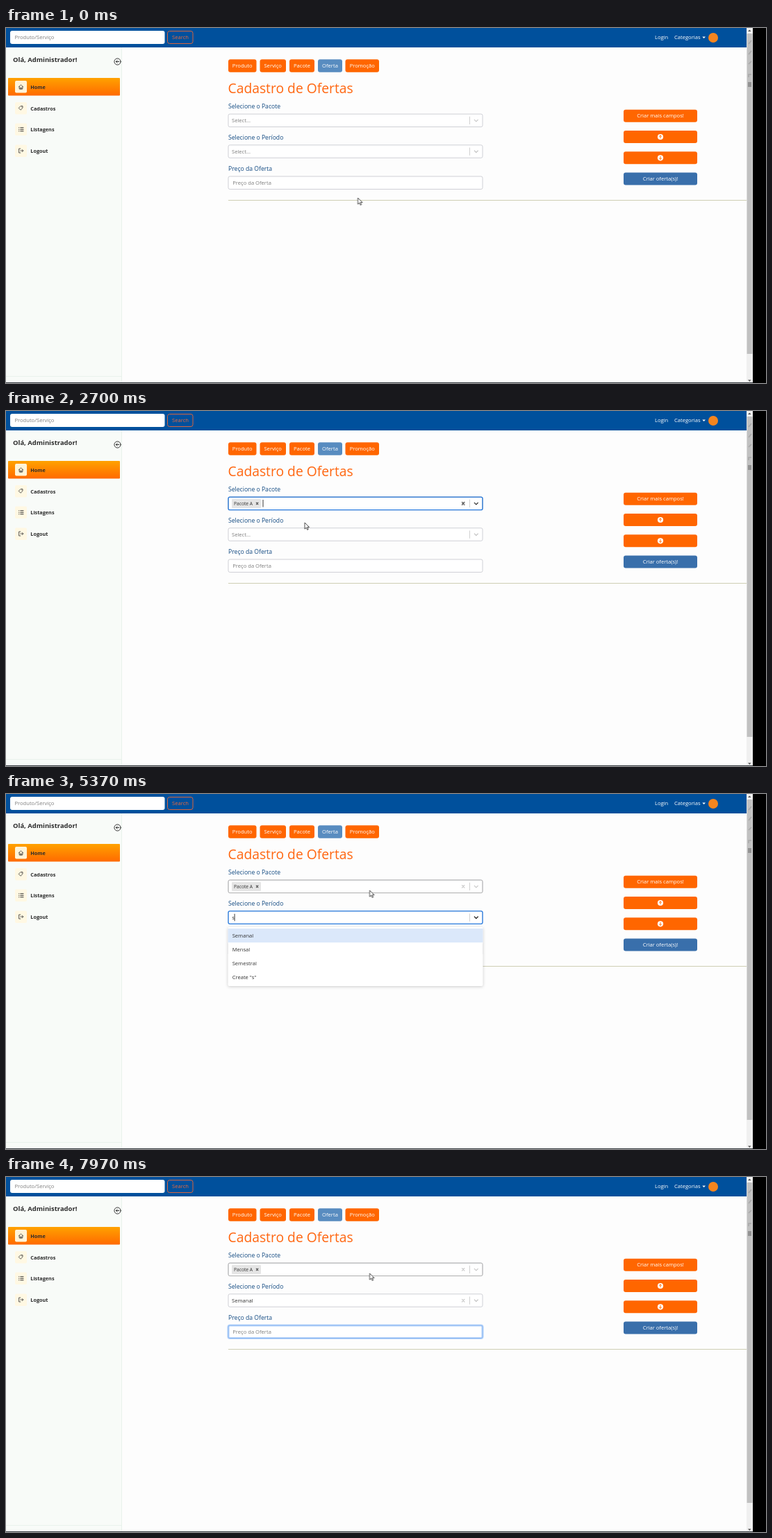
Recreate the animation shown at these times as an HTML page. Size 1094x512 px, loop 8000 ms.

```html
<!DOCTYPE html>
<html lang="pt-BR">
<head>
<meta charset="utf-8">
<title>Cadastro de Ofertas</title>
<style>
html, body { margin: 0; width: 100%; height: 100%; overflow: hidden; background: #fdfdfd; }
svg { display: block; width: 1094px; height: 512px; }
text { font: 7.6px "Open Sans", "Noto Sans", sans-serif; fill: #333; }
.mid { text-anchor: middle; }
.light { fill: #fff; }
.hint { fill: #7d7d7d; }
.label { font-size: 8.65px; font-weight: 500; fill: #124a82; }
.title { font-size: 19.3px; font-weight: 500; fill: #ff6610; }
.side { font-size: 7.25px; font-weight: 700; fill: #2b2b2b; }
.hello { font-size: 9.45px; font-weight: 700; fill: #2b2b2b; }
.chip { font-size: 6.7px; }
.orange { fill: #ff6600; }
.box { fill: #fff; stroke: #cfd0d6; }
.focus { fill: none; stroke: #2a7de1; stroke-width: 1.3; }
.line { fill: none; stroke: #333; stroke-linecap: round; stroke-linejoin: round; }
.pale { stroke: #c8c8c8; }
.caret { fill: #222; }
.menu { fill: #fff; filter: drop-shadow(0 1px 2px #0003); }
.active { fill: #dbe8fa; }

/* Every layer shares one 8 s clock; 1% = 80 ms. */
.t { animation: 8s step-end infinite; }
.hover1 { animation-name: hover1; }
.hint1 { animation-name: hint1; }
.focus1 { animation-name: focus1; }
.menu1 { animation-name: menu1; }
.chip1 { animation-name: chip1; }
.clear1 { animation-name: clear1; }
.caret1 { animation-name: caret1; }
.hint2 { animation-name: hint2; }
.focus2 { animation-name: focus2; }
.caret2 { animation-name: caret2; }
.key1 { animation-name: key1; }
.key2 { animation-name: key2; }
.key3 { animation-name: key3; }
.value2 { animation-name: value2; }
.clear2 { animation-name: clear2; }
.focus3 { animation-name: focus3; }
.caret3 { animation-name: caret3; }
.cursor { animation: cursor 8s linear infinite; }

@keyframes hover1 { 0% { opacity: 0 } 16.875% { opacity: 1 } }
@keyframes hint1 { 0% { opacity: 1 } 29.375% { opacity: 0 } }
@keyframes focus1 { 0%, 45% { opacity: 0 } 22.5% { opacity: 1 } }
@keyframes menu1 { 0%, 29.375% { opacity: 0 } 22.5% { opacity: 1 } }
@keyframes chip1 { 0% { opacity: 0 } 29.375% { opacity: 1 } }
@keyframes clear1 { 0%, 45% { opacity: 0 } 29.375% { opacity: 1 } }
@keyframes caret1 { 0%, 36%, 45% { opacity: 0 } 29.375%, 42.625% { opacity: 1 } }
@keyframes hint2 { 0% { opacity: 1 } 64.375% { opacity: 0 } }
@keyframes focus2 { 0%, 92.875% { opacity: 0 } 45% { opacity: 1 } }
@keyframes caret2 { 0%, 51.625%, 64.375%, 85.375% { opacity: 0 } 45%, 58.25%, 78.75% { opacity: 1 } }
@keyframes key1 { 0%, 70% { opacity: 0 } 64.375% { opacity: 1 } }
@keyframes key2 { 0%, 71.875% { opacity: 0 } 70% { opacity: 1 } }
@keyframes key3 { 0%, 78.75% { opacity: 0 } 71.875% { opacity: 1 } }
@keyframes value2 { 0% { opacity: 0 } 78.75% { opacity: 1 } }
@keyframes clear2 { 0%, 92.875% { opacity: 0 } 78.75% { opacity: 1 } }
@keyframes focus3 { 0% { opacity: 0 } 92.875% { opacity: 1 } }
@keyframes caret3 { 0%, 99.5% { opacity: 0 } 92.875% { opacity: 1 } }
@keyframes cursor {
  0%, 8.75% { transform: translate(506.5px, 245px) }
  17.5% { transform: translate(442.5px, 157px) }
  20%, 23% { transform: translate(436px, 134px) }
  27.5%, 36.25% { transform: translate(430px, 161px) }
  43.75%, 100% { transform: translate(523.5px, 139px) }
}
</style>
</head>
<body>
<svg viewBox="0 0 1094 512">
  <defs>
    <linearGradient id="glow" x2="0" y2="1">
      <stop stop-color="#ffa200"/><stop offset="1" stop-color="#ff6a00"/>
    </linearGradient>
    <path id="chevron" d="M-2.5-1.2 0 1.3 2.5-1.2"/>
    <path id="cross" d="M-1.7-1.8 1.7 1.8M1.7-1.8-1.7 1.8"/>
    <rect id="field" x="320" width="366" height="18.5" rx="2.2"/>
    <rect id="caret" width=".9" height="10.5"/>
    <rect id="wide" x="889" width="106" height="18" rx="3"/>
    <rect id="tile" x="13" width="17" height="17.5" rx="2"/>
    <path id="arrow" d="M0 2.2V-2.2M-1.8-.4 0-2.2 1.8-.4"/>
  </defs>

  <rect width="1094" height="512" fill="#fdfdfd"/>

  <!-- sidebar -->
  <rect y="28" width="166" height="484" fill="#f8fbf8"/>
  <path d="M0 502.5H166M166.5 28V512" fill="none" stroke="#e9f2ec"/>
  <text class="hello" x="10" y="49">Olá, Administrador!</text>
  <g class="line" transform="translate(160.5 48.5)">
    <circle r="4.6"/><use href="#arrow" transform="rotate(-90)"/>
  </g>
  <rect x="3" y="72" width="161" height="25.5" rx="1" fill="url(#glow)"/>
  <use href="#tile" y="76" fill="#fff4d8"/>
  <g fill="#fff8e3">
    <use href="#tile" y="107"/><use href="#tile" y="137.5"/><use href="#tile" y="168.5"/>
  </g>
  <g class="line" stroke-width=".8">
    <path d="M18.3 85 21.5 82 24.7 85M19.2 84.5V88H23.8V84.5M20.8 88V86H22.2V88"/>
    <path d="M18.5 115.2 21 112.6H24V115.3L21.3 118ZM22.7 114V114.1"/>
    <path d="M20.8 143.8H25M20.8 146.3H25M20.8 148.8H25M18.6 143.8H18.8M18.6 146.3H18.8M18.6 148.8H18.8" stroke-width="1.1"/>
    <path d="M20.8 174H18.6V180H20.8M20.8 177H24.8M23.3 175.5 24.8 177 23.3 178.5"/>
  </g>
  <text class="side" x="35.3" y="87.8">Home</text>
  <text class="side" x="35.3" y="118.6">Cadastros</text>
  <text class="side" x="35.3" y="149.4">Listagens</text>
  <text class="side" x="35.3" y="180.2">Logout</text>

  <!-- top bar -->
  <rect width="1066" height="28" fill="#00509c"/>
  <rect x="6" y="4" width="222.5" height="19" rx="3" fill="#fff"/>
  <text class="hint" x="12.5" y="16.4">Produto/Serviço</text>
  <rect x="232.5" y="4.5" width="36.5" height="18" rx="3" fill="none" stroke="#d9653f"/>
  <text class="mid" x="251" y="16.4" style="fill:#f0683a">Search</text>
  <text class="light" x="934" y="16.4">Login</text>
  <text class="light" x="962" y="16.4">Categorias</text>
  <path d="M1002.3 12.5H1007L1004.6 15Z" fill="#fff"/>
  <circle cx="1018" cy="14" r="7" fill="#f5851f"/>

  <!-- tabs -->
  <g class="orange">
    <rect x="320" y="45.3" width="40.5" height="18.5" rx="3"/>
    <rect x="365.5" y="45.3" width="37.5" height="18.5" rx="3"/>
    <rect x="408" y="45.3" width="36" height="18.5" rx="3"/>
    <rect x="488.5" y="45.3" width="48.5" height="18.5" rx="3"/>
  </g>
  <rect x="449" y="45.3" width="35" height="18.5" rx="3" fill="#588cc0"/>
  <g class="mid">
    <text class="light" x="340.2" y="57.4">Produto</text>
    <text class="light" x="384.2" y="57.4">Serviço</text>
    <text class="light" x="426" y="57.4">Pacote</text>
    <text class="light" x="466.5" y="57.4">Oferta</text>
    <text class="light" x="512.8" y="57.4">Promoção</text>
  </g>

  <!-- actions -->
  <g class="orange">
    <use href="#wide" y="117.8"/><use href="#wide" y="148"/><use href="#wide" y="178.2"/>
  </g>
  <use href="#wide" y="208.4" fill="#396fab"/>
  <text class="light mid" x="942" y="129.4">Criar mais campos!</text>
  <text class="light mid" x="942" y="220">Criar oferta(s)!</text>
  <g fill="#fff" stroke="#ff6600">
    <g transform="translate(942 157)"><circle r="4.1" stroke="none"/><use href="#arrow" fill="none"/></g>
    <g transform="translate(942 187.3) rotate(180)"><circle r="4.1" stroke="none"/><use href="#arrow" fill="none"/></g>
  </g>

  <!-- form -->
  <text class="title" x="319.5" y="94">Cadastro de Ofertas</text>
  <text class="label" x="320" y="116">Selecione o Pacote</text>
  <text class="label" x="320" y="160.7">Selecione o Período</text>
  <text class="label" x="320" y="206.2">Preço da Oferta</text>
  <path d="M320 248.5H1066" stroke="#cfcfb4"/>

  <use href="#field" class="box" y="124.1"/>
  <use href="#field" class="t hover1" y="124.1" fill="none" stroke="#b3b3b3"/>
  <use href="#field" class="box" y="168.8"/>
  <use href="#field" class="box" y="214"/>
  <path d="M667.5 127.7V139M667.5 172.5V183.8" stroke="#d0d0d0"/>
  <g class="line pale" stroke-width="1.2">
    <use href="#chevron" x="676.8" y="133.5"/>
    <use href="#chevron" x="676.8" y="178.2"/>
  </g>
  <text class="hint t hint1" x="325" y="136.2">Select...</text>
  <text class="hint t hint2" x="325" y="180.9">Select...</text>
  <text class="hint" x="326.3" y="226.2">Preço da Oferta</text>

  <g class="t focus1">
    <use href="#field" class="focus" y="124.1"/>
    <use href="#chevron" class="line" x="676.8" y="133.5" stroke-width="1.2"/>
  </g>
  <g class="t chip1">
    <rect x="325" y="127" width="42" height="13" rx="1.2" fill="#e5e5e5"/>
    <text class="chip" x="328" y="136">Pacote A</text>
    <use href="#cross" class="line" transform="translate(361.6 133.4) scale(.75)" stroke-width="1.4"/>
    <use href="#cross" class="line pale" x="658.2" y="133.4" stroke-width="1.2"/>
  </g>
  <use href="#cross" class="line t clear1" x="658.2" y="133.4" stroke-width="1.2"/>
  <use href="#caret" class="caret t caret1" x="369.5" y="128"/>

  <g class="t focus2">
    <use href="#field" class="focus" y="168.8"/>
    <use href="#chevron" class="line" x="676.8" y="178.2" stroke-width="1.2"/>
  </g>
  <use href="#caret" class="caret t caret2" x="325" y="172.8"/>
  <g class="t value2">
    <text x="325" y="180.9">Semanal</text>
    <use href="#cross" class="line pale" x="658.2" y="178.2" stroke-width="1.2"/>
  </g>
  <use href="#cross" class="line t clear2" x="658.2" y="178.2" stroke-width="1.2"/>

  <g class="t focus3">
    <use href="#field" y="214" fill="none" stroke="#bcd7fb" stroke-width="3.2"/>
    <use href="#field" y="214" fill="none" stroke="#86b4f0"/>
    <use href="#caret" class="caret t caret3" x="326" y="218.2"/>
  </g>

  <!-- option lists -->
  <g class="t menu1">
    <rect class="menu" x="319.5" y="147.2" width="367" height="44.8" rx="2"/>
    <rect class="active" x="319.5" y="149.4" width="367" height="20.2"/>
    <text x="325.7" y="162.2">Pacote A</text>
    <text x="325.7" y="182.4">Pacote B</text>
  </g>
  <g class="t key1">
    <text x="325.3" y="180.9">s</text>
    <use href="#caret" class="caret" x="328.6" y="172.8"/>
    <rect class="menu" x="319.5" y="192" width="367" height="85" rx="2"/>
    <rect class="active" x="319.5" y="194" width="367" height="20.2"/>
    <text x="325.7" y="206.8">Semanal</text>
    <text x="325.7" y="227">Mensal</text>
    <text x="325.7" y="247.2">Semestral</text>
    <text x="325.7" y="267.4">Create "s"</text>
  </g>
  <g class="t key2">
    <text x="325.3" y="180.9">se</text>
    <use href="#caret" class="caret" x="333" y="172.8"/>
    <rect class="menu" x="319.5" y="192" width="367" height="65" rx="2"/>
    <rect class="active" x="319.5" y="194" width="367" height="20.2"/>
    <text x="325.7" y="206.8">Semanal</text>
    <text x="325.7" y="227">Semestral</text>
    <text x="325.7" y="247.2">Create "se"</text>
  </g>
  <g class="t key3">
    <text x="325.3" y="180.9">sem</text>
    <use href="#caret" class="caret" x="340.2" y="172.8"/>
    <rect class="menu" x="319.5" y="192" width="367" height="65" rx="2"/>
    <rect class="active" x="319.5" y="194" width="367" height="20.2"/>
    <text x="325.7" y="206.8">Semanal</text>
    <text x="325.7" y="227">Semestral</text>
    <text x="325.7" y="247.2">Create "sem"</text>
  </g>

  <!-- scrollbar and screen edge -->
  <rect x="1066" width="9" height="512" fill="#f0f0f0"/>
  <rect x="1066.5" y="8" width="8" height="462" fill="#c1c1c1"/>
  <path d="M1068 5 1070.3 2.5 1072.6 5ZM1068 507.5H1072.6L1070.3 510Z" fill="#555"/>
  <path d="M1069 23 1073 18M1069 38 1073 33M1069 52 1073 48M1069 71V67H1073" fill="none" stroke="#a8a8a8" stroke-width="1.6"/>
  <rect x="1068" y="78" width="5" height="7" fill="#929292"/>
  <rect x="1075" width="19" height="512" fill="#000"/>
  <rect y="511" width="1075" height="1" fill="#3c4146"/>

  <path class="cursor" d="M0 0V9.2L2.2 7.2 3.7 10.4 5.2 9.7 3.7 6.6H6.6Z" fill="#fff" stroke="#222" stroke-width=".8" stroke-linejoin="round"/>
</svg>
</body>
</html>
```
